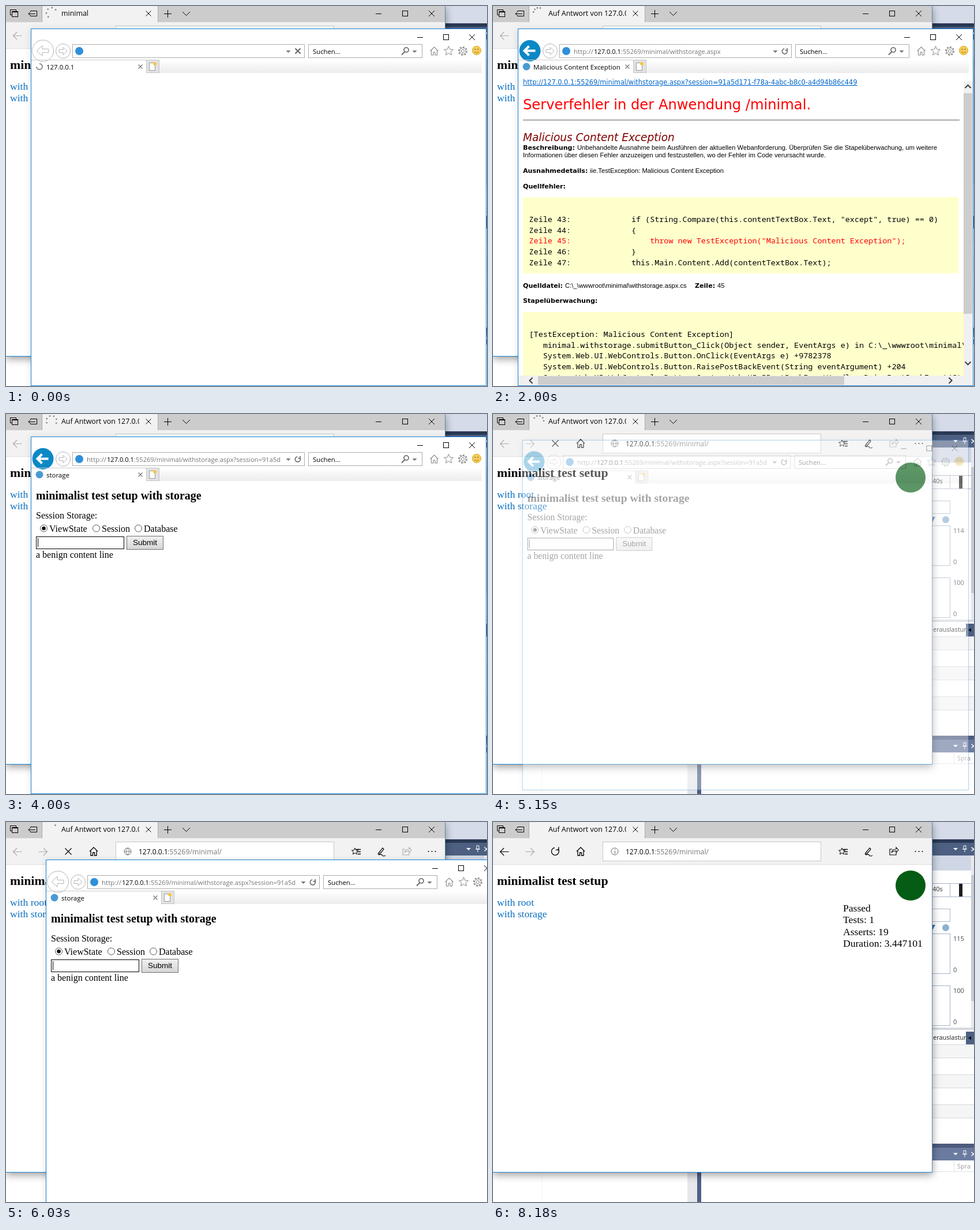
An HTML page that plays this animation: 834 px wide and 658 px high, repeating every 9260 ms.

```html
<!DOCTYPE html>
<html lang="de">
<head>
<meta charset="utf-8">
<style>
html, body { margin: 0; width: 100%; height: 100%; overflow: hidden; background: #fff; }
svg { display: block; width: 834px; height: 658px; }
text { white-space: pre; }
</style>
</head>
<body>
<svg id="stage" viewBox="0 0 834 658"></svg>
<script>
const UI = "'Open Sans', sans-serif", SERIF = "'Liberation Serif', serif",
      WIDE = "'DejaVu Sans', sans-serif", SANS = "'Liberation Sans', sans-serif",
      MONO = "'Noto Sans Mono', monospace", ACCENT = '#1883d7';

const esc = s => s.replace(/&/g, '&amp;').replace(/</g, '&lt;');
const text = (x, y, s, size, font, fill = '#000', more = '') =>
  `<text x="${x}" y="${y}" font-size="${size}" font-family="${font}" fill="${fill}" ${more}>${esc(s)}</text>`;
const box = (x, y, w, h, fill, more = '') =>
  `<rect x="${x}" y="${y}" width="${w}" height="${h}" fill="${fill}" ${more}/>`;
// outlined box whose 1px border covers whole pixels
const frame = (x, y, w, h, stroke, fill = '#fff') =>
  box(x + .5, y + .5, w - 1, h - 1, fill, `stroke="${stroke}"`);
const path = (d, stroke = '#000', w = 1, fill = 'none') =>
  `<path d="${d}" stroke="${stroke}" stroke-width="${w}" fill="${fill}"/>`;
const dot = (x, y, r, fill, stroke = 'none', w = 1) =>
  `<circle cx="${x}" cy="${y}" r="${r}" fill="${fill}" stroke="${stroke}" stroke-width="${w}"/>`;

// icons, centred on x, y
const cross = (x, y, r, c, w) => path(`M${x - r} ${y - r}l${2 * r} ${2 * r}m0 ${-2 * r}l${-2 * r} ${2 * r}`, c, w);
const down = (x, y, r, c) => path(`M${x - r} ${y - r / 2}h${2 * r}l${-r} ${r}z`, 'none', 0, c);
const arrow = (x, y, r, dir, h, c, w) =>
  path(`M${x - dir * r} ${y}h${2 * r * dir}m${-h * dir} ${-h}l${h * dir} ${h}l${-h * dir} ${h}`, c, w);
const reload = (x, y, r, c, w) =>
  path(`M${x + r * .7} ${y - r * .7}A${r} ${r} 0 1 1 ${x - r * .2} ${y - r}`, c, w) +
  path(`M${x + r * .9} ${y - r * 1.2}v${r * .8}h${-r * .8}`, c, w);
const house = (x, y, c, w) =>
  path(`M${x - 7} ${y}l7 -7l7 7m-12 -1v8h3.5v-5h3v5h3.5v-8`, c, w);
const star = (x, y, r, c) => {
  const pts = Array.from({ length: 10 }, (_, i) => {
    const a = i * Math.PI / 5, k = i % 2 ? r * .45 : r;
    return (x + k * Math.sin(a)).toFixed(1) + ' ' + (y - k * Math.cos(a)).toFixed(1);
  });
  return path(`M${pts.join('L')}z`, c);
};
// minimise, maximise and close, one step apart
const captions = (x, y, step) => path(`M${x - 5} ${y + .5}h10`) +
  frame(x + step - 5, y - 5, 10, 10, '#000', 'none') + cross(x + 2 * step, y, 5);
const pin = (x, y) => path(`M${x - 2} ${y - 5}h4v6h-4zm-2 6h8m-4 0v5`, '#fff');

function ide(load) {
  let s = box(762, 0, 72, 30, '#d6dbe9') + box(762, 30, 72, 6, '#293955') +
    box(762, 36, 72, 22, '#4d6082') + box(762, 58, 72, 26, '#cfd6e5') + box(762, 84, 72, 273, '#fff') +
    down(802, 47, 4, '#fff') + pin(818, 46) + cross(833, 47, 3.5, '#fff', 1.3);
  s += frame(740, 106, 90, 24, '#a9b5c9') + path('M792.5 106v24', '#a9b5c9') +
    text(762, 120, '40s', 11, UI, '#333') + box(808, 107, 6, 22, '#1e1e1e') +
    frame(740, 150, 53, 23, '#a9b9cc') +
    path('M760 178h7l-5 9z', 'none', 0, '#3f74b5') + dot(785, 183, 6, '#8ab2d0') +
    frame(740, 193, 53, 70, '#a3b4c8') + frame(740, 283, 53, 70, '#a3b4c8');
  [[206, load], [260, '0'], [296, '100'], [350, '0']].forEach(([y, n]) => s += text(798, y, n, 11, UI, '#444'));
  s += box(829, 58, 5, 299, '#e8e8ec') + box(829, 92, 5, 218, '#c9cad0') +
    box(762, 356, 72, 4, '#d5d8df') + text(763, 377, 'erauslastur', 11, UI, '#1e1e1e') +
    box(820, 363, 14, 22, '#4d6082') + path('M829 371v6l-5 -3z', 'none', 0, '#000');
  [385, 437, 489].forEach(y => s += box(762, y, 72, 23, '#f5f5f5') + path(`M762 ${y + .5}h72m0 23h-72`, '#d5d8e3'));
  return s + box(762, 557, 72, 7, '#4d5b7c') + box(762, 564, 72, 22, '#6b7ba0') +
    down(802, 575, 4, '#fff') + pin(818, 574) + cross(833, 575, 3.5, '#fff', 1.3) +
    path('M799.5 587v19M762 605.5h72', '#dde0e8') + text(805, 600, 'Spra', 11, UI, '#999') +
    path('M84.5 606v52', '#f3f3f3') + box(337, 606, 17, 52, '#e6e7ec') + box(354, 606, 7, 52, '#4f5f85');
}

function spinner([start, gap, n]) {
  let s = '';
  for (let i = 0; i < n; i++) {
    const a = (start + i * gap) * Math.PI / 180;
    s += dot(79 + 9 * Math.cos(a), 12 + 9 * Math.sin(a), 1.4, '#888');
  }
  return s;
}

function edge(st) {
  const { done } = st, off = done ? '#000' : '#aaa';
  let s = box(0, 0, 762, 607, '#fff', 'style="filter:drop-shadow(0 4px 7px #0006)"') +
    box(0, 0, 762, 28, '#ccc') + box(0, 28, 762, 45, '#f2f2f2') + box(62, 0, 202, 29, '#f2f2f2') +
    path('M62.5 0v28M263.5 0v28', '#aaa') + path('M0 73.5h762', '#dcdcdc') +
    path('M10 15.5h-2.5v-9h10v2.5') + frame(10, 9, 11, 10, '#000', 'none') + path('M10 10.500h11') +
    path('M42.5 10v-1.500h11v9h-11v-1.500') + arrow(45, 13.5, 6, -1, 3, '#000') +
    spinner(st.spin) +
    text(96, 17, st.title, 12.4, UI, '#000', 'clip-path="url(#title)"') +
    cross(247, 13, 4.5, '#000') + path('M274 13.500h13M280.500 7v13') + path('M306 10l6.500 6.500l6.500 -6.500') +
    captions(646, 13, 46);
  s += arrow(20, 51.5, 7.5, -1, 6.5, off, 1.2) + arrow(64, 51.5, 7.5, 1, 6.5, '#aaa', 1.2) +
    (done ? reload(108, 51, 6.5, '#000', 1.3) : cross(108, 51, 5.5, '#000', 1.2)) + house(152, 51, '#000', 1.3) +
    frame(190, 34, 379, 34, '#c8c8c8') + dot(211, 51, 6, 'none', '#666') +
    (done ? path('M211.500 47v1.500m0 1.500v5', '#666')
          : path('M205 51h12M211 45q-5.500 6 0 12q5.500 -6 0 -12', '#666', .8)) +
    text(230, 56, '127.0.0.1', 12, UI) + text(280, 56, ':55269/minimal/', 12.3, UI, '#777') +
    star(605, 51, 6, '#000') + path('M607 47.500h8m-6 4h6m-5 4h5', '#000', 1.3) +
    path('M645 56q1 -3 4 -6l4 -5l2 2l-4 5q-4 4 -5 5q5 -2 7 1q1 2 5 0', '#000', 1.2) +
    path('M692 47h-4v10h11v-4M691 53q1 -6 8 -6v-3l4 4.500l-4 4.500v-3q-5 0 -8 3', off, 1.1);
  [732, 738, 744].forEach(x => s += dot(x + .5, 51, 1, '#000'));
  s += text(7, 109, 'minimalist test setup', 21.8, SERIF, '#000', 'font-weight="bold"') +
    text(7, 145, 'with root', 17.6, SERIF, '#0a6ebd') + text(7, 165, 'with storage', 17.6, SERIF, '#0a6ebd') +
    dot(724, 110, 26, '#055c14');
  if (done) ['Passed', 'Tests: 1', 'Asserts: 19', 'Duration: 3.447101'].forEach((line, i) =>
    s += text(607, 155 + i * 20.3, line, 17.6, SERIF));
  return s + path('M0 606.500h762', ACCENT) + path('M761.500 0v606', '#5b88ad');
}

function form(st) {
  let s = text(52, 148, 'minimalist test setup with storage', 20, SERIF, '#000', 'font-weight="bold"') +
    text(52, 181, 'Session Storage:', 16, SERIF);
  [[65.5, 'ViewState'], [156.5, 'Session'], [229.5, 'Database']].forEach(([x, label]) =>
    s += dot(x, 198, 6, '#fff', '#555') + text(x + 9.5, 204, label, 16, SERIF));
  s += dot(65.5, 198, 3.3, '#111') + frame(52, 212, 153, 22, '#000') +
    text(55, 227, st.input, 13.6, SANS);
  const caret = { '': 55.5, 'Except': 96.5 }[st.input];
  if (caret) s += path(`M${caret} 215v15`);
  if (st.input) s += cross(195.5, 223, 3.5, '#222', 1.4);
  return s + frame(209, 211, 64, 24, '#707070', 'url(#button)') + text(220, 227, 'Submit', 13.5, SANS) +
    (st.content ? text(52, 249, 'a benign content line', 16, SERIF) : '');
}

const SESSION = '?session=91a5d171-f78a-4abc-b8c0-a4d94b86c449';

function failure(st) {
  const bold = (x, y, s) => text(x, y, s, 11.1, WIDE, '#000', 'font-weight="bold"');
  const small = (x, y, s) => text(x, y, s, 11.23, SANS);
  const code = (y, lines) => lines.map((l, i) =>
    text(62.5, y + i * 18.7, l, 13.44, MONO, l.startsWith('Zeile 45') ? '#f00' : '#000')).join('');
  const gap = ' '.repeat(13);
  const s = text(52, 136, 'http://127.0.0.1:55269/minimal/withstorage.aspx' + SESSION, 11.4, WIDE,
      st.clicked ? '#800080' : '#06c', 'text-decoration="underline"') +
    text(52, 179, 'Serverfehler in der Anwendung /minimal.', 24.2, WIDE, '#f00') +
    box(52, 196, 757, 3, '#c0c0c0') +
    text(52, 234, 'Malicious Content Exception', 18.55, WIDE, '#800000', 'font-style="italic"') +
    bold(52, 249, 'Beschreibung:') +
    small(146, 249, 'Unbehandelte Ausnahme beim Ausführen der aktuellen Webanforderung. Überprüfen Sie die Stapelüberwachung, um weitere') +
    small(52, 262, 'Informationen über diesen Fehler anzuzeigen und festzustellen, wo der Fehler im Code verursacht wurde.') +
    bold(52, 289, 'Ausnahmedetails:') + small(168, 289, 'iie.TestException: Malicious Content Exception') +
    bold(52, 316, 'Quellfehler:') + box(52, 331, 755, 132, '#ffc') +
    code(374, [
      `Zeile 43:${gap}if (String.Compare(this.contentTextBox.Text, "except", true) == 0)`,
      `Zeile 44:${gap}{`,
      `Zeile 45:${gap}    throw new TestException("Malicious Content Exception");`,
      `Zeile 46:${gap}}`,
      `Zeile 47:${gap}this.Main.Content.Add(contentTextBox.Text);`]) +
    bold(52, 488, 'Quelldatei:') + small(125, 488, 'C:\\_\\wwwroot\\minimal\\withstorage.aspx.cs') +
    bold(350, 488, 'Zeile:') + small(389, 488, '45') +
    bold(52, 514, 'Stapelüberwachung:') + box(52, 530, 764, 120, '#ffc') +
    code(573, [
      '[TestException: Malicious Content Exception]',
      '   minimal.withstorage.submitButton_Click(Object sender, EventArgs e) in C:\\_\\wwwroot\\minimal\\withstorage.aspx.cs:45',
      '   System.Web.UI.WebControls.Button.OnClick(EventArgs e) +9782378',
      '   System.Web.UI.WebControls.Button.RaisePostBackEvent(String eventArgument) +204',
      '   System.Web.UI.WebControls.Button.System.Web.UI.IPostBackEventHandler.RaisePostBackEvent(String eventArgument) +12']);
  return `<g clip-path="url(#page)">${s}</g>` +
    box(816, 131, 16, 509, '#f0f0f0') + box(816, 151, 15, 382, '#cdcdcd') +
    box(44, 640, 788, 17, '#f0f0f0') + box(78, 641, 531, 15, '#cdcdcd') +
    path('M818.500 142l5 -5l5 5M818.500 616l5 5l5 -5M68.500 643.500l-5 5l5 5M790.500 643.500l5 5l-5 5', '#444', 2.2);
}

// Browser window at its first position; pos shifts, scales and fades it.
function win(st, { shift = 0, scale = 1, alpha = 1 }) {
  let s = box(43, 39, 790, 619, '#fff', 'style="filter:drop-shadow(0 2px 6px #0002)"') +
    captions(718, 54, 45) + box(266, 93, 559, 23, 'url(#strip)') +
    (st.back ? dot(64, 77.5, 18.5, '#0c88c6') + arrow(64, 77.5, 9.5, -1, 8, '#fff', 4)
             : dot(64, 77.5, 18.5, '#fff', '#b4b4b4') + path('M53 77.500l10 -9v6h11v6h-11v6z', '#b4b4b4')) +
    dot(99, 78, 12.5, '#fff', '#b4b4b4') + path('M106 78l-7 -6.500v4h-7v5h7v4z', '#b4b4b4') +
    frame(115, 66, 403, 24, '#adadad') + frame(524, 66, 198, 24, '#adadad') + dot(127, 78, 7, '#2f8fd8') +
    down(489.5, 79, 4, '#777') +
    (st.busy ? cross(506, 78, 4.5, '#666', 2) : reload(506, 78.5, 4.5, '#666', 1.6)) +
    text(532, 83, 'Suchen...', 11.3, UI) +
    dot(694, 76, 4, 'none', '#666', 1.7) + path('M691 79.500l-5 5', '#666', 2) + down(708.5, 79, 4, '#777') +
    house(742.5, 78, '#888', 1.1) + star(767.5, 78, 8.5, '#888') +
    dot(792, 78, 2.6, 'none', '#888') + dot(792, 78, 5.4, 'none', '#888') +
    `<circle cx="792" cy="78" r="7" fill="none" stroke="#888" stroke-width="2" stroke-dasharray="2.750"/>` +
    dot(816, 77, 7.5, '#f5cf55', '#d9a520') + dot(813.5, 75, 1, '#765') + dot(818.5, 75, 1, '#765') +
    path('M812 79.500q4 3 8 0', '#a8772a');
  if (st.query !== null) s += text(140, 83, 'http://', 11.6, UI, '#777') + text(175, 83, '127.0.0.1', 11.1, UI) +
    text(222, 83, ':55269/minimal/withstorage.aspx' + st.query, 11.1, UI, '#777');
  s += path('M44 93.500h199.500v22', '#ccc') + frame(243, 93, 23, 23, '#c4c4c4', '#e2e2e2') +
    path('M248.500 98.500h7l3 3v10h-10z', '#999', 1, '#fff') + dot(258, 100, 2.8, '#f7c62f') +
    (st.busy ? path('M58 100a5 5 0 1 1 -5 5', '#888', 2) : dot(58, 105, 6.5, '#4a9ad2')) +
    text(70, 110, st.tab, 11.45, UI) + cross(233, 105, 3.5, '#888', 1.6) +
    (st.page ? st.page(st) : '') + frame(43, 39, 790, 619, ACCENT, 'none');
  return `<g opacity="${alpha}" transform="translate(${shift} ${shift}) translate(430 330) scale(${scale}) translate(-430 -330)">${s}</g>`;
}

const WAIT = 'Auf Antwort von 127.0.0.1', QUERY = SESSION.slice(0, 14);
const blank = { page: null, query: null, tab: '', back: false, busy: false };
const loaded = { page: form, input: '', tab: 'storage', busy: false };
// [time, changes]; each step keeps what the earlier ones set
const steps = [
  [0, { ...blank, tab: '127.0.0.1', busy: true, title: 'minimal', load: '114', front: {}, spin: [130, 48, 5] }],
  [80, { query: '', title: WAIT, spin: [155, 45, 5] }],
  [160, { ...loaded, spin: [180, 40, 5] }],
  [230, { spin: [205, 36, 5] }],
  [310, { input: 'a benign content line', spin: [235, 34, 5] }],
  [380, { spin: [265, 32, 4] }],
  [460, { tab: '127.0.0.1', busy: true, spin: [300, 30, 3] }],
  [1040, { input: 'Except', content: true, back: true, spin: [150, 32, 4] }],
  [1120, { spin: [170, 34, 5] }],
  [1200, { spin: [195, 36, 5] }],
  [1270, { spin: [225, 36, 5] }],
  [1350, { spin: [255, 33, 4] }],
  [1930, { page: failure, spin: [170, 33, 4] }],
  [2000, { tab: 'Malicious Content Exception', busy: false, spin: [190, 33, 4] }],
  [3000, { query: QUERY, clicked: true, busy: true, tab: '127.0.0.1', spin: [210, 40, 5] }],
  [4000, { ...loaded, spin: [160, 45, 6] }],
  [5070, { front: { scale: .99, alpha: .65 }, spin: [190, 40, 5] }],
  [5150, { front: { scale: .98, alpha: .35 }, spin: [215, 36, 5] }],
  [5230, { front: null, behind: { scale: .971, alpha: .22 }, spin: [240, 32, 4] }],
  [5800, { ...blank, front: { shift: 26, scale: .971, alpha: .38 }, spin: [255, 30, 4] }],
  [5880, { front: { shift: 26, scale: .985, alpha: .7 }, spin: [270, 28, 3] }],
  [5950, { front: { shift: 26, scale: .995, alpha: .9 }, spin: [285, 26, 2] }],
  [6030, { ...loaded, query: QUERY, front: { shift: 26 }, behind: null, spin: [315, 0, 1] }],
  [8030, { front: { shift: 26, scale: .99, alpha: .6 }, spin: [0, 0, 0] }],
  [8110, { front: { shift: 26, scale: .98, alpha: .25 } }],
  [8180, { front: null, done: true, load: '115' }]
];

const defs = `<defs>
  <clipPath id="title"><rect x="96" y="0" width="135" height="28"/></clipPath>
  <clipPath id="page"><rect x="44" y="116" width="772" height="524"/></clipPath>
  <linearGradient id="button" x2="0" y2="1"><stop stop-color="#f0f0f0"/><stop offset="1" stop-color="#d6d6d6"/></linearGradient>
  <linearGradient id="strip" x2="0" y2="1"><stop stop-color="#fff"/><stop offset="1" stop-color="#ececec"/></linearGradient>
</defs>`;
const stage = document.getElementById('stage');
const begin = performance.now();
let shown = 0;

function tick() {
  const t = (performance.now() - begin) % 9260, past = steps.filter(s => s[0] <= t);
  if (past.length !== shown) {
    shown = past.length;
    const st = Object.assign({}, ...past.map(s => s[1]));
    stage.innerHTML = defs + ide(st.load) +
      (st.behind ? win({ ...blank, ...loaded, content: true }, st.behind) : '') +
      edge(st) + (st.front ? win(st, st.front) : '');
  }
  requestAnimationFrame(tick);
}
tick();
</script>
</body>
</html>
```
